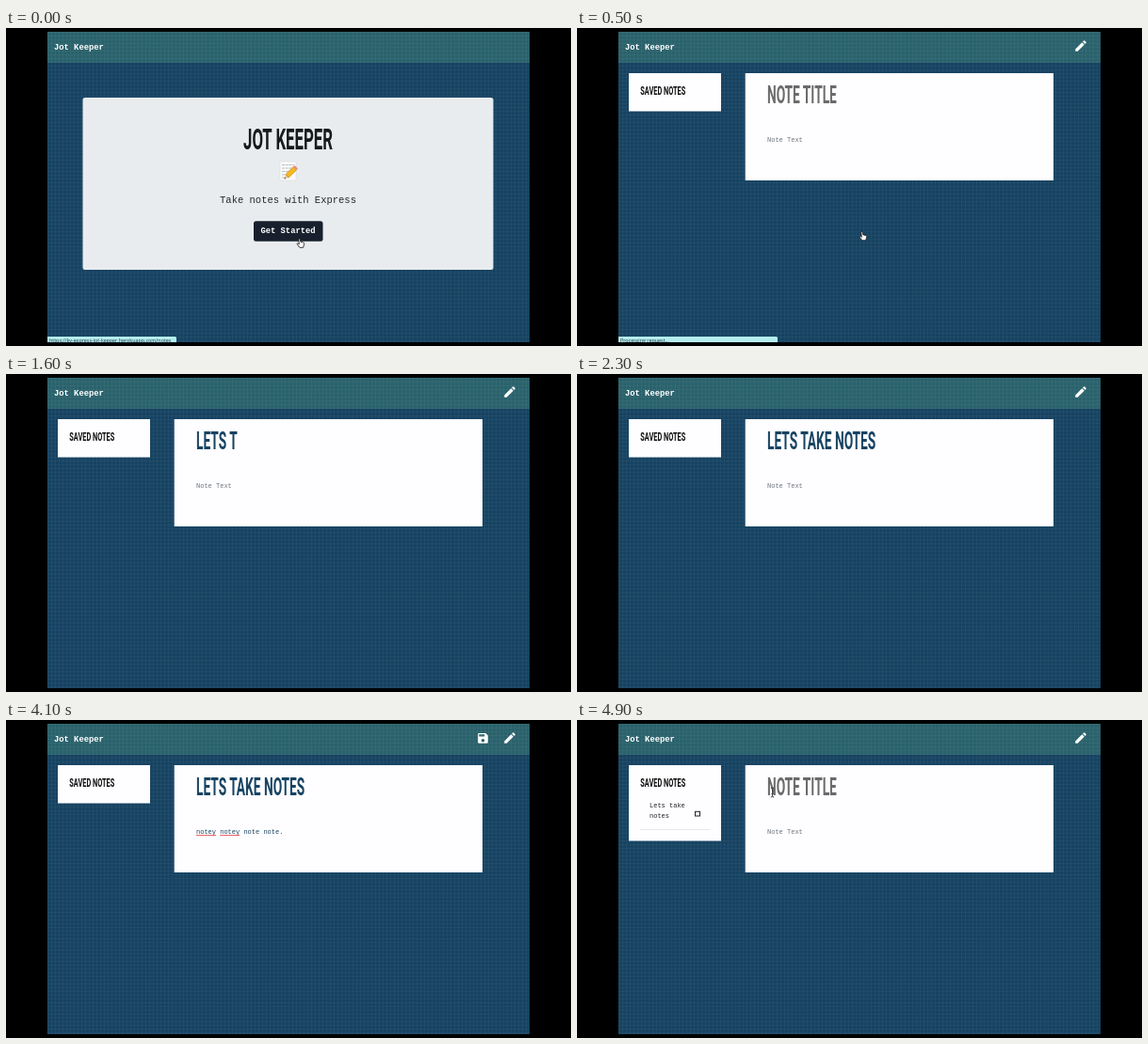
These frames come from a looping animation (600 by 338 pixels, 5000 ms). An HTML page:

```html
<!DOCTYPE html>
<html lang="en">
<head>
<meta charset="utf-8">
<title>Jot Keeper</title>
<style>
  html, body { margin: 0; width: 100%; height: 100%; overflow: hidden; background: #000; }
  svg { display: block; width: 600px; height: 338px; }
  text { white-space: pre; font-family: "Liberation Mono", monospace; }
  .bold { font-weight: 700; font-size: 8.8px; fill: #fff; }
  .small { font-size: 7px; }
  .heading { font-family: Roboto, sans-serif; font-weight: 700; }
  .status { font-family: "Open Sans", sans-serif; font-size: 5.4px; fill: #234; }
</style>
</head>
<body>
<svg viewBox="0 0 600 338">
  <defs>
    <pattern id="weave" width="4" height="4" patternUnits="userSpaceOnUse">
      <path d="M0 .5H4M.5 0V4" stroke="#fff" stroke-opacity=".035"/>
    </pattern>
  </defs>

  <rect x="44" y="4" width="512" height="330" fill="#174362"/>
  <rect x="44" y="4" width="512" height="33" fill="#2a626c"/>
  <rect x="44" y="4" width="512" height="330" fill="url(#weave)"/>
  <text class="bold" x="51" y="22.5">Jot Keeper</text>

  <g id="home">
    <rect x="81.5" y="74" width="436" height="183" rx="2.5" fill="#e9ecef"/>
    <text class="heading" transform="translate(299.5 129) scale(.55 1)" font-size="30.5" text-anchor="middle" fill="#17191d">JOT KEEPER</text>
    <g id="memo">
      <path d="M291 142H308V162H291Z" fill="#fafafa" stroke="#d5d7d9" stroke-width=".5"/>
      <path d="M293 145.5H306M293 149H306M293 152.5H304M293 156H300M293 159H298" stroke="#a9adb1" stroke-width=".8" stroke-dasharray="3 .7"/>
      <path d="M295.5 160.5 297 155.5 300 159Z" fill="#e8c79b"/>
      <path d="M297 155.5 305 147.5 308.5 151 300 159.2Z" fill="#f5b820" stroke="#a87010" stroke-width=".5"/>
      <path d="M305 147.5 306.7 146 310 149.5 308.5 151Z" fill="#e58c86"/>
      <path d="M295.5 160.5 296 158.8 297.2 160Z" fill="#333"/>
    </g>
    <text x="299.5" y="186" font-size="10.5" text-anchor="middle" fill="#24282d">Take notes with Express</text>
    <rect id="focus" x="261.7" y="204.2" width="76" height="23.8" rx="3" fill="#858b94"/>
    <rect x="263" y="205.3" width="73.5" height="21.5" rx="2.5" fill="#18202d"/>
    <text class="bold" x="299.5" y="218.3" text-anchor="middle">Get Started</text>
  </g>

  <g id="editor">
    <rect id="list" x="55" y="48" width="98" fill="#fefdff"/>
    <text class="heading" transform="translate(67.3 70.5) scale(.55 1)" font-size="13.4" fill="#111">SAVED NOTES</text>
    <g id="saved">
      <text class="small" x="77" y="93.2" fill="#222">Lets take</text>
      <text class="small" x="77" y="103.7" fill="#222">notes</text>
      <rect x="125.5" y="97.3" width="5" height="4.7" fill="none" stroke="#222"/>
      <path d="M67 116.5H141" stroke="#dfe1e5" stroke-width=".8"/>
    </g>
    <rect x="178.7" y="48" width="327.3" height="114" fill="#fefdff"/>
    <text id="title" class="heading" transform="translate(202 79.8) scale(.55 1)" font-size="25"></text>
    <text id="body" class="small" x="202" y="121"></text>
    <path id="typo1" d="M202 122.6h21" stroke="#e8484c" stroke-width=".9"/>
    <path id="typo2" d="M227.2 122.6h21" stroke="#e8484c" stroke-width=".9"/>
    <path transform="translate(527.3 11.3) scale(.645)" fill="#fff" d="M3 17.25V21h3.75L17.81 9.94l-3.75-3.75zM20.71 7.04a1 1 0 0 0 0-1.41l-2.34-2.34a1 1 0 0 0-1.41 0l-1.83 1.83 3.75 3.75z"/>
    <path id="save" transform="translate(499.4 12.3) scale(.59)" fill="#fff" d="M17 3H5a2 2 0 0 0-2 2v14a2 2 0 0 0 2 2h14a2 2 0 0 0 2-2V7zm-5 16a3 3 0 1 1 0-6 3 3 0 0 1 0 6zm3-10H5V5h10z"/>
  </g>

  <g id="status">
    <path id="bar" fill="#b4eeee"/>
    <text id="message" class="status" x="46" y="333.6"></text>
  </g>

  <g id="cursor">
    <path id="hand" d="M-2.2-4.3C-2.2-5.2-.7-5.2-.6-4.3L-.2-1.7 2.7-1C3.7-.7 3.8 0 3.5 1L2.7 4.3H-1.2L-3.8.8C-4.1-.1-3-.6-2.4.2L-1.7.9Z" fill="#fff" stroke="#111" stroke-width=".8"/>
    <path id="arrow" d="M0 0V8.5L2 6.7 3.3 9.6 4.7 9 3.4 6.1H6Z" fill="#111" stroke="#fff" stroke-width=".6"/>
    <path id="beam" d="M-1.7-5Q0-5 0-3.8Q0-5 1.7-5M0-4V4M-1.7 5Q0 5 0 3.8Q0 5 1.7 5M-1 1.5H1" fill="none" stroke="#333" stroke-width=".9"/>
  </g>
</svg>

<script>
const LOOP = 5000, STEP = 100;
const TITLE = "LETS TAKE NOTES", BODY = "notey notey note note.";
const $ = id => document.getElementById(id);
const show = (id, on) => $(id).style.display = on ? "" : "none";

// Linear interpolation through [time, value, ...] keys.
function along(keys, t) {
  const next = keys.findIndex(k => k[0] > t);
  if (next < 0) return keys.at(-1).slice(1);
  if (next === 0) return keys[0].slice(1);
  const a = keys[next - 1], b = keys[next], p = (t - a[0]) / (b[0] - a[0]);
  return a.slice(1).map((v, i) => v + (b[i + 1] - v) * p);
}

const titleKeys = [[1100, 0], [1200, 1], [1800, 9], [2300, 15]];
const bodyKeys = [[2400, 0], [2500, 1], [3100, 10], [3200, 10], [3300, 12], [3800, 21], [3900, 22]];
const paths = [
  { from: 0, to: 600, keys: [[0, 313, 229], [300, 304, 221.5]], shape: () => "hand" },
  { from: 600, to: 1000, keys: [[600, 272, 170], [900, 212, 74]], shape: t => t < 800 ? "arrow" : "beam" },
  { from: 4200, to: 5000, keys: [[4200, 320, 108], [4500, 506, 20], [4700, 506, 20], [4900, 207.5, 77]],
    shape: t => t < 4400 ? "beam" : t < 4800 ? "hand" : "beam" }
];

function typed(id, text, placeholder, count, colors) {
  $(id).textContent = count ? text.slice(0, count) : placeholder;
  $(id).setAttribute("fill", colors[count ? 1 : 0]);
}

function drawStatus(t) {
  show("status", t < 700);
  const linked = t < 300, right = linked ? 181 : 213;
  $("bar").setAttribute("d", `M44 328H${right - 1.5}q1.5 0 1.5 1.5V334H44Z`);
  $("message").textContent = linked ? "https://kv-express-jot-keeper.herokuapp.com/notes"
    : t < 500 ? "Connecting..." : "Processing request...";
  $("message").setAttribute("text-decoration", linked ? "underline" : "none");
}

function drawCursor(t) {
  const path = paths.find(p => t >= p.from && t < p.to);
  show("cursor", path);
  if (!path) return;
  $("cursor").setAttribute("transform", `translate(${along(path.keys, t)})`);
  for (const id of ["hand", "arrow", "beam"]) show(id, id === path.shape(t));
}

function draw(t) {
  const saved = t >= 4700;
  const titleCount = saved ? 0 : Math.round(along(titleKeys, t)[0]);
  const bodyCount = saved ? 0 : Math.round(along(bodyKeys, t)[0]);
  show("home", t < 500);
  show("focus", t >= 400);
  show("editor", t >= 500);
  show("saved", saved);
  $("list").setAttribute("height", saved ? 80.5 : 40.5);
  typed("title", TITLE, "NOTE TITLE", titleCount, ["#6a6a6a", "#174362"]);
  typed("body", BODY, "Note Text", bodyCount, ["#6c757d", "#174362"]);
  show("typo1", bodyCount > 5);
  show("typo2", bodyCount > 11);
  show("save", bodyCount > 0);
  drawStatus(t);
  drawCursor(t);
}

const start = performance.now();
function tick() {
  const t = (performance.now() - start) % LOOP;
  draw(Math.floor(t / STEP) * STEP);
  requestAnimationFrame(tick);
}
tick();
</script>
</body>
</html>
```
